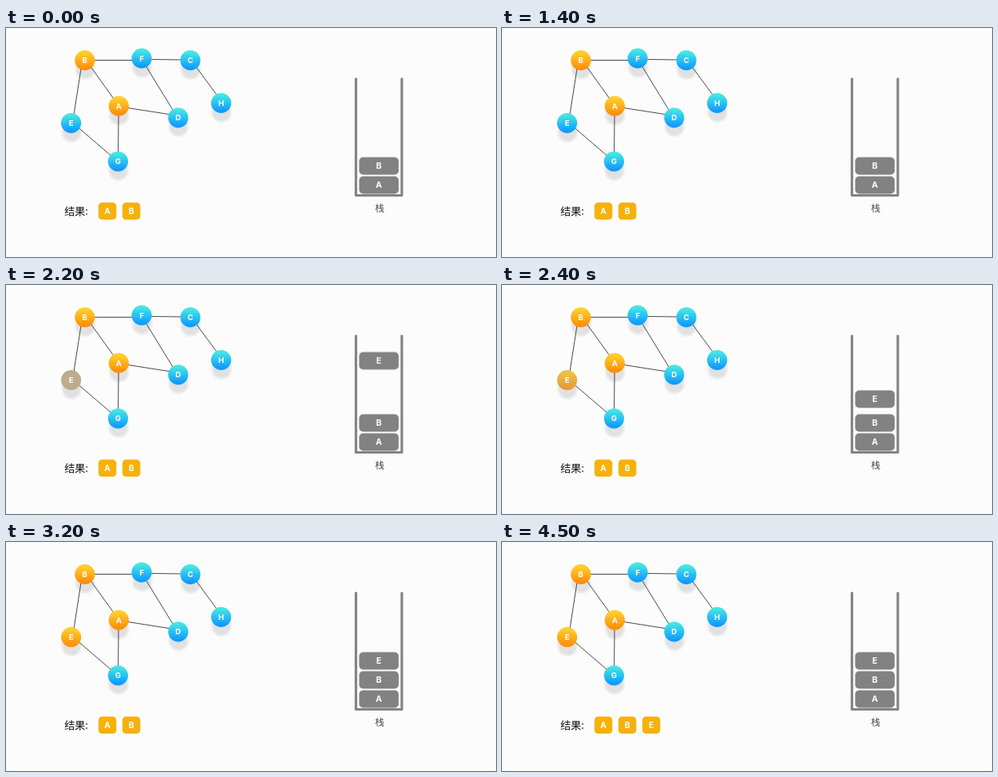
Recreate the animation shown at these times as an HTML page. Size 614x288 px, loop 4600 ms.

```html
<!DOCTYPE html>
<html lang="zh-CN">
<head>
<meta charset="utf-8">
<style>
  html, body { margin: 0; width: 100%; height: 100%; overflow: hidden; background: #fcfcfc; }
  svg { display: block; width: 614px; height: 288px; }
  text { font-family: Inter, "Liberation Sans", sans-serif; font-weight: 700; fill: #fff; text-anchor: middle; }
  .label { font-family: "Noto Sans CJK SC", "Noto Sans CJK", sans-serif; font-weight: 400; }
</style>
</head>
<body>
<svg id="stage" viewBox="0 0 614 288">
  <defs>
    <filter id="soft" x="-50%" y="-50%" width="200%" height="200%">
      <feGaussianBlur stdDeviation="1.8"/>
    </filter>
  </defs>
</svg>
<script>
const LOOP = 4600;
const stage = document.getElementById('stage');
const defs = stage.querySelector('defs');

const BLUE = ['#46e6e4', '#0f9bff'];
const ORANGE = ['#ffd02c', '#ff8e0a'];
const MIXED = '#beac8c';

const nodes = {
  A: [141.3, 98.2], B: [98.8, 40.6], C: [231, 40.7], D: [215.8, 112.8],
  E: [81.6, 119.6], F: [170, 38.2], G: [140.4, 167.8], H: [269.6, 94.4]
};

// Each edge runs from rim to rim: x1, y1, x2, y2
const edges = [
  [111, 40.5, 158, 40.5], [182, 39.5, 219, 40], [239, 50, 264, 84],
  [176, 49, 209, 103], [153, 100.5, 204, 108.5], [107, 50, 135, 89],
  [94, 51, 85, 109], [91.5, 126, 131, 160], [141, 110, 140.6, 156]
];

function add(tag, attrs, parent = stage) {
  const el = document.createElementNS('http://www.w3.org/2000/svg', tag);
  for (const k in attrs) el.setAttribute(k, attrs[k]);
  parent.appendChild(el);
  return el;
}

function write(str, x, y, size, parent, extra) {
  add('text', { x, y: y + size * 0.364, 'font-size': size, ...extra }, parent).textContent = str;
}

// steps: [time in ms, style, easing to the next step]
function play(el, steps) {
  const frames = steps.map(([t, style, easing = 'linear']) => ({ offset: t / LOOP, easing, ...style }));
  el.animate(frames, { duration: LOOP, iterations: Infinity });
}

function fadeIn(el, from, to) {
  play(el, [
    [0, { opacity: 0 }], [from, { opacity: 0 }],
    [to, { opacity: 1 }], [LOOP, { opacity: 1 }]
  ]);
}

function gradient(id, colors) {
  const g = add('linearGradient', { id, x1: 0, y1: 0, x2: 0, y2: 1 }, defs);
  return colors.map((c, i) => {
    const stop = add('stop', { offset: i ? 0.9 : 0.1 }, g);
    stop.style.stopColor = c;
    return stop;
  });
}

function tile(letter, x, y, w, h, r, fill, size) {
  const g = add('g', {});
  add('rect', { x, y, width: w, height: h, rx: r, fill }, g);
  write(letter, x + w / 2, y + h / 2, size, g);
  return g;
}

const block = (letter, level) => tile(letter, 442.5, 186.5 - 24 * level, 49.5, 22, 5, '#828282', 10.5);
const result = (letter, i) => tile(letter, 115.8 + 30 * i, 219.6, 22.5, 21.5, 4.5, '#f6b10b', 10);

// Graph
gradient('blue', BLUE);
gradient('orange', ORANGE);
const visiting = gradient('visiting', BLUE);

for (const [x, y] of Object.values(nodes))
  add('circle', { cx: x + 0.5, cy: y + 11.5, r: 12, fill: '#e1e1e1', filter: 'url(#soft)' });

for (const [x1, y1, x2, y2] of edges)
  add('line', { x1, y1, x2, y2, stroke: '#484848', 'stroke-width': 1 });

for (const [name, [cx, cy]] of Object.entries(nodes)) {
  const paint = name === 'E' ? 'visiting' : 'AB'.includes(name) ? 'orange' : 'blue';
  add('circle', { cx, cy, r: 12.6, fill: `url(#${paint})` });
  write(name, cx, cy, 9.6);
}

visiting.forEach((stop, i) => play(stop, [
  [0, { stopColor: BLUE[i] }],
  [1900, { stopColor: BLUE[i] }],
  [2200, { stopColor: MIXED }],
  [2500, { stopColor: ORANGE[i] }],
  [LOOP, { stopColor: ORANGE[i] }]
]));

// Stack
add('path', {
  d: 'M438.5 64V210.5H496V64', fill: 'none', stroke: '#848484',
  'stroke-width': 3.2, 'stroke-linecap': 'round', 'stroke-linejoin': 'round'
});
block('A', 0);
block('B', 1);
const pushed = block('E', 2);
const high = { transform: 'translateY(-109px)' }, home = { transform: 'translateY(0px)' };
play(pushed, [[0, high], [1900, high, 'ease-in-out'], [2500, home], [LOOP, home]]);
fadeIn(pushed, 1900, 2000);
write('栈', 468.3, 226.4, 11.5, stage, { class: 'label', style: 'fill:#444' });

// Result row
write('结果:', 73.3, 230.3, 13, stage, { class: 'label', style: 'fill:#111;text-anchor:start' });
result('A', 0);
result('B', 1);
fadeIn(result('E', 2), 3200, 3600);
</script>
</body>
</html>
```
